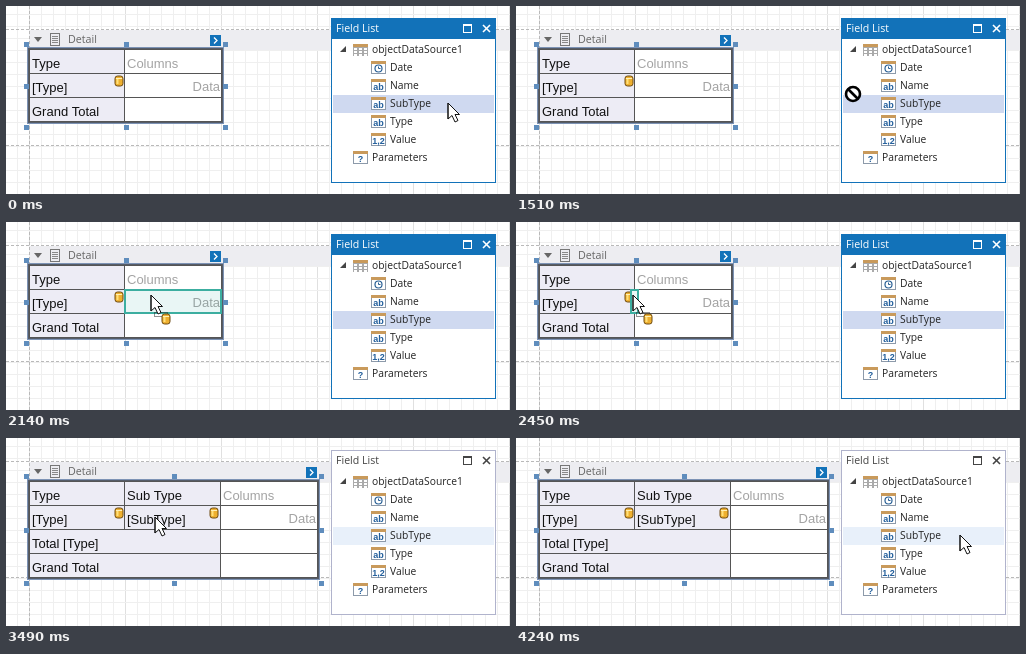
These frames come from a looping animation (504 by 188 pixels, 5.27 s). An HTML page with a canvas:

```html
<!DOCTYPE html>
<html lang="en">
<head>
<meta charset="utf-8">
<title>Field drag and drop</title>
<style>
html, body { margin: 0; width: 100%; height: 100%; overflow: hidden; background: #fff; }
canvas { display: block; }
</style>
</head>
<body>
<canvas id="stage" width="504" height="188"></canvas>
<script>
const g = document.getElementById('stage').getContext('2d');
const LOOP = 5270;
const ARIAL = '13px "Liberation Sans", Arial, sans-serif';
const UI = '10.3px "Open Sans", sans-serif';
const TEAL = '#3caea0', BLUE = '#1272b9';

// time, x, y of the pointer tip
const path = [
  [0, 442, 97], [1030, 442, 97], [1180, 434, 96], [1360, 400, 93], [1510, 338, 88],
  [1570, 303, 85], [1690, 238, 82], [1810, 194, 80], [1950, 168, 76], [2080, 151, 73],
  [2140, 145, 73], [2200, 127, 73], [2330, 127, 73], [2450, 117, 73], [3010, 117, 73],
  [3070, 121, 76], [3430, 121, 76], [3580, 190, 83], [3850, 377, 98], [3970, 426, 100],
  [4060, 436, 99], [4240, 444, 97], [LOOP, 444, 97]
];

function pointer(t) {
  const i = path.findIndex(p => p[0] > t);
  const a = path[i - 1], b = path[i], k = (t - a[0]) / (b[0] - a[0]);
  return [Math.round(a[1] + (b[1] - a[1]) * k), Math.round(a[2] + (b[2] - a[2]) * k)];
}

function box(x, y, w, h, fill) {
  g.fillStyle = fill;
  g.fillRect(x, y, w, h);
}

function frame(x, y, w, h, color, width = 1) {
  g.strokeStyle = color;
  g.lineWidth = width;
  g.strokeRect(x + width / 2, y + width / 2, w - width, h - width);
}

function line(points, color, width = 1) {
  g.strokeStyle = color;
  g.lineWidth = width;
  g.beginPath();
  points.forEach(p => g.lineTo(...p));
  g.stroke();
}

function poly(points, fill) {
  g.fillStyle = fill;
  g.beginPath();
  points.forEach(p => g.lineTo(...p));
  g.fill();
}

function text(s, x, y, font, color, align = 'left') {
  g.font = font;
  g.fillStyle = color;
  g.textAlign = align;
  g.fillText(s, x, y);
}

function drum(x, y) {
  g.beginPath();
  g.roundRect(x - 4, y - 5, 8, 10, 2.5);
  g.fillStyle = '#eeb02f';
  g.fill();
  g.strokeStyle = '#6d4a12';
  g.lineWidth = 1;
  g.stroke();
  box(x - 2.5, y - 3, 2, 6, '#ffe07a');
  line([[x - 3, y - 2.5], [x + 3, y - 2.5]], '#fff0b5');
}

function page(bandHot) {
  box(0, 0, 504, 188, '#fff');
  for (let x = 11; x < 504; x += 12) box(x, 0, 1, 188, (x - 23) % 96 ? '#efefef' : '#e0e0e0');
  for (let y = 8; y < 188; y += 12) box(0, y, 504, 1, '#efefef');
  box(23, 24, 481, 20, '#ededf1');
  if (bandHot) {
    box(22, 44, 482, 96, 'rgba(60,174,160,.1)');
    frame(22, 44, 482, 96, TEAL, 2);
  }
  g.setLineDash([3, 2]);
  line([[0, 23.5], [504, 23.5]], '#b9b9b9');
  line([[0, 139.5], [504, 139.5]], '#b9b9b9');
  line([[23.5, 0], [23.5, 188]], '#b9b9b9');
  g.setLineDash([]);
  poly([[28, 31], [36, 31], [32, 36]], '#666');
  frame(44, 27, 10, 13, '#777');
  for (let y = 30; y < 38; y += 2) box(46, y, 6, 1, '#888');
  text('Detail', 62, 37, '10.7px "Open Sans", sans-serif', '#666');
}

function cell(x, y, w, h, s, hint) {
  box(x, y, w, h, hint ? '#fff' : '#edecf5');
  frame(x, y, w + 1, h + 1, '#555');
  if (s == 'Data') text(s, x + w - 1, y + 18, ARIAL, '#a3a3a3', 'right');
  else text(s, x + 3, y + 19, ARIAL, hint ? '#a3a3a3' : '#111');
}

function table(wide) {
  const right = wide ? 311 : 215, bottom = wide ? 139 : 115, data = wide ? 214 : 118;
  const last = right - data;
  cell(23, 43, 95, 24, 'Type');
  cell(23, 67, 95, 24, '[Type]');
  if (wide) {
    cell(118, 43, 96, 24, 'Sub Type');
    cell(118, 67, 96, 24, '[SubType]');
    cell(23, 91, 191, 24, 'Total [Type]');
    cell(data, 91, last, 24, '', true);
    drum(208, 75);
  }
  cell(23, bottom - 24, data - 23, 24, 'Grand Total');
  cell(data, 43, last, 24, 'Columns', true);
  cell(data, 67, last, 24, 'Data', true);
  cell(data, bottom - 24, last, 24, '', true);
  drum(113, 75);
  frame(21, 41, right - 18, bottom - 38, '#7d93b5');
  frame(22, 42, right - 20, bottom - 40, '#555c68');

  const mx = Math.round((20 + right + 4) / 2), my = Math.round((38 + bottom + 6) / 2);
  for (const x of [20, mx, right + 4])
    for (const y of [38, my, bottom + 6])
      if (x != mx || y != my) box(x - 2, y - 2, 5, 5, '#5f8dbd');

  const bx = right - 11;
  box(bx, 29, 11, 11, BLUE);
  line([[bx + 4, 31.5], [bx + 7, 34.5], [bx + 4, 37.5]], '#fff', 1.3);
}

function fieldIcon(x, y, mark) {
  box(x - 7, y - 6, 15, 13, '#fff');
  frame(x - 7, y - 6, 15, 13, '#8d9aaa');
  box(x - 7, y - 6, 15, 3, '#c99a5b');
  if (mark == 'clock') {
    g.beginPath();
    g.arc(x + .5, y + 1.5, 3.5, 0, 7);
    g.strokeStyle = '#285f95';
    g.lineWidth = 1.2;
    g.stroke();
    line([[x + .5, y - .5], [x + .5, y + 1.5], [x + 2.5, y + 1.5]], '#285f95');
  } else {
    text(mark, x + .5, y + 5, 'bold 9px "Liberation Sans", sans-serif', '#235f9c', 'center');
  }
}

function fieldList(active) {
  const ink = active ? '#fff' : '#444';
  box(325, 12, 165, 165, '#fff');
  if (active) box(325, 12, 165, 21, BLUE);
  frame(325, 12, 165, 165, active ? BLUE : '#b0b3cc');
  text('Field List', 330, 26, '10.6px "Open Sans", sans-serif', ink);
  frame(457, 18, 9, 9, ink);
  box(457, 18, 9, 2, ink);
  line([[477, 19], [484, 26]], ink, 1.6);
  line([[484, 19], [477, 26]], ink, 1.6);

  box(327, 89, 161, 18, active ? '#cfd9f0' : '#e8f0fa');
  poly([[334, 46], [340, 40], [340, 46]], '#444');
  box(347, 38, 15, 12, '#aaa');
  box(347, 38, 15, 3, '#c99a5b');
  for (let i = 0; i < 9; i++) box(348 + i % 3 * 5, 42 + (i / 3 | 0) * 3, 3, 2, '#fff');
  text('objectDataSource1', 366, 47, UI, '#222');
  [['Date', 'clock'], ['Name', 'ab'], ['SubType', 'ab'], ['Type', 'ab'], ['Value', '1,2']]
    .forEach(([name, mark], i) => {
      const y = 61 + i * 18;
      fieldIcon(372, y, mark);
      text(name, 384, y + 4, UI, '#222');
    });
  fieldIcon(354, 151, '?');
  text('Parameters', 366, 155, UI, '#222');
}

function arrow(x, y) {
  const outline = [[0, 0], [0, 16], [4, 12.5], [7, 19], [10, 17.5], [7, 11.5], [11.5, 11.5]]
    .map(([a, b]) => [x + a, y + b]);
  poly(outline, '#fff');
  line([...outline, outline[0], outline[1]], '#111');
}

function denied(x, y) {
  g.beginPath();
  g.arc(x, y, 7, 0, 7);
  g.fillStyle = '#fff';
  g.fill();
  g.strokeStyle = '#000';
  g.lineWidth = 2.6;
  g.stroke();
  line([[x - 5, y - 5], [x + 5, y + 5]], '#000', 2.6);
}

function dragArrow(x, y) {
  g.setLineDash([1, 1]);
  frame(x + 3, y + 17, 14, 5, '#222');
  g.setLineDash([]);
  arrow(x, y);
  drum(x + 15, y + 24);
}

function draw(t) {
  const [x, y] = pointer(t);
  const dragging = t >= 1570 && t < 2910;
  const overTable = dragging && x < 216;
  page(dragging && !overTable);
  table(t >= 3070);
  if (overTable && x >= 124) {
    box(119, 67, 97, 25, 'rgba(60,174,160,.11)');
    frame(118, 67, 98, 25, TEAL, 2);
  } else if (t >= 2360 && t < 3070) {
    box(114, 67, 9, 25, '#eaf5f3');
    frame(114, 67, 9, 25, TEAL, 2);
  }
  fieldList(t < 2950);
  if (t >= 1090 && t < 1570) denied(x, y);
  else if (dragging) dragArrow(x, y);
  else arrow(x, y);
}

function tick() {
  draw(performance.now() % LOOP);
  requestAnimationFrame(tick);
}
tick();
</script>
</body>
</html>
```
